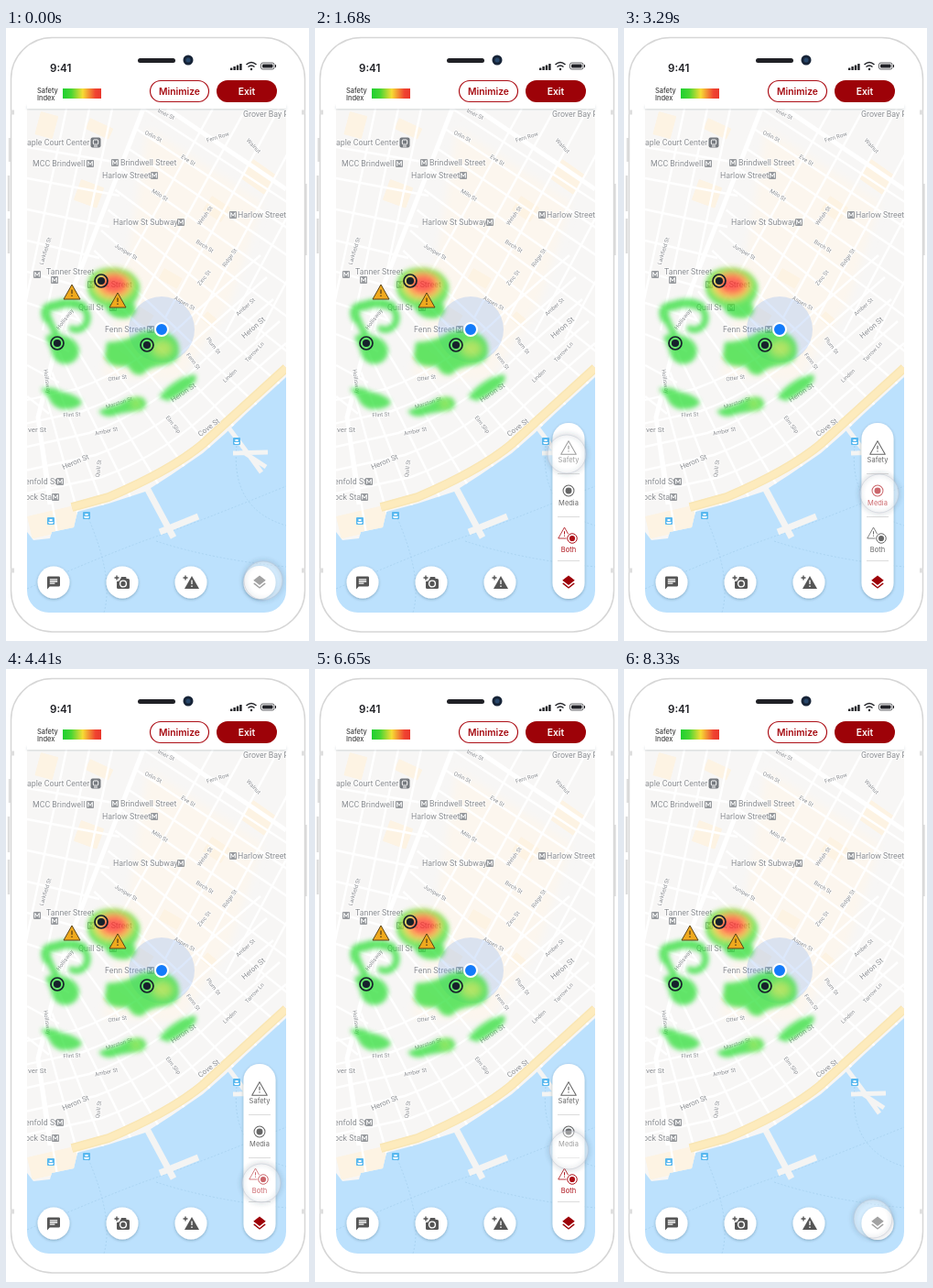
These frames come from a looping animation (331 px wide and 669 px high, 8400 ms). An HTML page:

```html
<!DOCTYPE html>
<html lang="en">
<head>
<meta charset="utf-8">
<title>Safety map</title>
<style>
html, body { margin: 0; width: 100%; height: 100%; overflow: hidden; background: #fff; }
svg { display: block; width: 331px; height: 669px; }
text { font-family: Inter, Roboto, sans-serif; }
.map text { font-family: Roboto, Arial, sans-serif; fill: #8a8d91; stroke: #fff; stroke-width: 1.6px; stroke-opacity: .8; paint-order: stroke; }
.item { --c: #666; color: var(--c); }
.item.on { --c: #ad1018; }
.item text { font-size: 7.5px; text-anchor: middle; fill: currentColor; }
</style>
</head>
<body>
<svg id="stage" viewBox="0 0 331 669" xmlns="http://www.w3.org/2000/svg"></svg>
<script>
const LOOP = 8400, STEP = 70;
const many = (n, fn) => Array.from({ length: n }, (_, i) => fn(i)).join('');
const path = (d, attrs = '') => `<path d="${d}" ${attrs}/>`;
const at = (x, y, body, scale = 1) => `<g transform="translate(${x} ${y}) scale(${scale})">${body}</g>`;
const disc = (x, y, r, attrs) => `<circle cx="${x}" cy="${y}" r="${r}" ${attrs}/>`;
const box = (x, y, w, h, r, attrs) => `<rect x="${x}" y="${y}" width="${w}" height="${h}" rx="${r}" ${attrs}/>`;

const LAND = 'M23 88H306V381L262 421L239 443L215 464L180 488L152 506L112 519L78 528L74 545L50 550L48 557L30 559L23 550Z';
const ROAD = 'M72 523L112 512Q180 483 215 454L240 431L306 371';
const LAYERS = 'M12 18.5L4.6 12.8L3 14.1L12 21L21 14.1L19.4 12.8ZM12 16L21 9L12 2L3 9Z';
const CHAT = 'M20 2H4Q2 2 2 4V22L6 18H20Q22 18 22 16V4Q22 2 20 2ZM6 6H18V8H6ZM6 9H18V11H6ZM6 12H14V14H6Z';

// Horizontal station names and their markers
const places = [
  ['aple Court Center', 23, 128], ['MCC Brindwell', 29, 151], ['Brindwell Street', 125, 150],
  ['Harlow Street', 105, 164], ['Harlow St Subway', 117, 215], ['Harlow Street', 253, 207],
  ['Tanner Street', 44, 269], ['k Street', 108, 283], ['Quill St', 79, 308],
  ['Fenn Street', 108, 332], ['enfold St', 21, 498], ['ock Sta', 21, 515], ['Grover Bay P', 259, 97]
];
const stations = [[92, 148], [119, 147], [162, 161], [191, 212], [248, 204], [34, 269], [53, 275],
  [93, 280], [117, 305], [158, 329], [59, 495], [54, 512]];

// Angled street names: text, x, y, rotation
const streets = [
  ['lmer St', 174, 96, 25], ['Orlin St', 160, 120, 27], ['Fern Row', 232, 121, -17],
  ['Walnut', 269, 130, 46], ['Milo St', 167, 184, 32], ['Welsh St', 219, 206, -54],
  ['Eve St', 198, 146, 32], ['Juniper St', 130, 246, 32], ['Aspen St', 194, 302, 30],
  ['Larkfield St', 45, 244, -73], ['Hollisway', 66, 319, -53], ['Birch St', 216, 240, 32],
  ['Ridge St', 246, 252, -55], ['Zinc St', 218, 274, -52], ['Amber St', 263, 306, -42],
  ['Plum St', 225, 348, 52], ['Fenn St', 203, 365, 52], ['Otter St', 122, 384, -8],
  ['Marston St', 124, 411, -18], ['Amber St', 110, 442, -12], ['Flint St', 72, 424, -3],
  ['Hollisway', 43, 386, 82], ['Tarrow Ln', 273, 355, -47], ['Linden', 246, 381, -43],
  ['Elm Slip', 181, 434, 52], ['Quill St', 103, 481, -82]
];
const avenues = [['Heron St', 272, 329, -41], ['Heron St', 195, 400, -34],
  ['Heron St', 77, 476, -23], ['Cove St', 223, 438, -37], ['ver St', 34, 441, 0]];

const turned = size => ([s, x, y, a]) =>
  `<text font-size="${size}" text-anchor="middle" transform="translate(${x} ${y}) rotate(${a})">${s}</text>`;

function streetGrid() {
  const shoreLines = many(5, i => path('M23 508L105 490Q175 465 235 406L306 344', `transform="translate(${-7 * i} ${-24 * i})"`));
  const crossings = many(16, i => {
    const k = i / 15, angle = (33 + 48 * k * k) * Math.PI / 180;
    const x = 150 - 115 * k, y = 88 + 332 * k;
    return path(`M${x} ${y}l${260 * Math.cos(angle)} ${260 * Math.sin(angle)}`);
  });
  const west = many(9, i => path(`M23 ${130 + 34 * i}l${112 - 11 * i} 19`));
  const north = many(3, i => path(`M${15 + 25 * i} 330L${66 + 25 * i} 88`));
  const east = many(7, i => path(`M${108 + 33 * i} ${300 + 8 * i}L${226 + 36 * i} 88`));
  return `<g fill="none" stroke="#fff" stroke-width="2.4">${shoreLines + crossings + west + north + east}
    <g stroke-width="5">${path('M150 88L65 306L35 425L48 520')}${path('M176 88L306 176')}</g></g>`;
}

function pier() {
  return `<g fill="none" stroke="#f4f4f3">
    ${path('M154 502L183 556M168 550L210 533', 'stroke-width="7"')}
    ${path('M243 436L261 460L279 485M248 464L286 463M261 464L284 479', 'stroke-width="5"')}</g>`;
}

function mapLayer() {
  const blocks = [[82, 165, 27, 24, 20], [38, 91, 20, 26, 15], [92, 98, 28, 13, 25], [270, 143, 32, 25, 35],
    [225, 183, 24, 19, 33], [173, 262, 23, 13, 30], [143, 302, 22, 15, 32], [115, 346, 24, 18, 35],
    [220, 309, 16, 11, 40], [23, 533, 54, 25, -13]];
  const boats = [[49, 538], [88, 532], [252, 451]];
  return `<g class="map" clip-path="url(#screen)">
    ${box(23, 88, 283, 550, 0, 'fill="#bce1fd"')}
    ${path('M23 612Q120 570 164 555T306 500M90 535Q118 600 107 638M164 560Q225 580 306 588M252 456Q245 525 306 543',
      'fill="none" stroke="#a5d0ee" stroke-width=".8" stroke-dasharray="2 2"')}
    ${pier()}${path(LAND, 'fill="#f7f6f5"')}
    <g clip-path="url(#land)">
      ${path('M155 110L280 190L245 300L190 385L105 380L130 270Z', 'fill="#fcf6ee" filter="url(#wide)"')}
      ${blocks.map(([x, y, w, h, a]) => box(x, y, w, h, 1, `fill="#fdf3e3" transform="rotate(${a} ${x} ${y})"`)).join('')}
      ${streetGrid()}
      ${path(ROAD, 'fill="none" stroke="#f9e6b4" stroke-width="10"')}
      ${path(ROAD, 'fill="none" stroke="#fdebbd" stroke-width="7"')}
    </g>
    ${places.map(([s, x, y]) => `<text font-size="8.8" x="${x}" y="${y}">${s}</text>`).join('')}
    ${streets.map(turned(6.2)).join('')}${avenues.map(turned(8)).join('')}
    ${stations.map(([x, y]) => at(x, y, box(-4, -4, 8, 8, 1, 'fill="#96999d"') +
      path('M-2.3 2.5V-2.5L0 1L2.3-2.5V2.5', 'fill="none" stroke="#fff" stroke-width="1"'))).join('')}
    ${at(98, 125, box(-5.5, -5.5, 11, 11, 2, 'fill="#777b80"') + box(-2.7, -3, 5.4, 5, 1, 'fill="none" stroke="#fff"') + path('M-2 4H2', 'stroke="#fff"'))}
    ${boats.map(([x, y]) => at(x, y, box(-4, -4, 8, 8, 1, 'fill="#59b8ef"') + path('M-3 1H3L2 3H-2ZM-1.5-2H1.5V0H-1.5Z', 'fill="#fff"'))).join('')}
  </g>`;
}

function heatLayer() {
  const green = [
    'M89 281Q90 263 114 262Q140 262 146 281Q146 294 139 300Q147 313 131 317Q113 318 108 304Q89 298 89 281Z',
    'M43 337Q51 331 60 335Q78 338 80 352Q79 366 64 367Q51 365 49 351Z',
    'M110 343Q133 342 147 332Q181 326 188 345Q193 365 172 368Q156 370 149 378Q139 381 133 369Q111 371 108 359Z',
    'M38 394Q49 390 61 397Q80 401 83 409Q79 417 60 416Q50 413 47 404Z',
    'M101 418Q112 413 124 410Q138 400 150 404Q157 411 148 417L124 421Q109 428 101 418Z',
    'M167 403Q175 391 192 382L206 378Q211 382 202 391Q190 401 177 407Z'
  ];
  return `<g opacity=".74">
    <g fill="#2fdf38" filter="url(#soft)">${green.map(d => path(d)).join('')}
      ${path('M45 317Q39 304 54 303Q70 297 84 304', 'fill="none" stroke="#2fdf38" stroke-width="10" stroke-linecap="round"')}
      ${path('M84 304Q93 316 86 325Q78 332 72 328M46 315Q50 328 57 336', 'fill="none" stroke="#2fdf38" stroke-width="7" stroke-linecap="round"')}
    </g>
    <g filter="url(#wide)">
      <ellipse cx="117" cy="281" rx="23" ry="17" fill="#ffe12f"/>
      <ellipse cx="118" cy="280" rx="17" ry="13" fill="#ff2c20"/>
      <ellipse cx="171" cy="350" rx="12" ry="10" fill="#a5e534"/>
      <ellipse cx="142" cy="410" rx="4" ry="4" fill="#c2e52d"/>
    </g></g>`;
}

const bang = color => path('M0-2.5V2M0 3.5V5', `stroke="${color}" stroke-width="1.3" fill="none"`);
const triangle = (fill, color, width) =>
  path('M0-8L9 8H-9Z', `fill="${fill}" stroke="${color}" stroke-width="${width}" stroke-linejoin="round"`) + bang(color);
const target = (x, y, s = 1, width = 1.7) =>
  at(x, y, disc(0, 0, 7, `fill="none" stroke="currentColor" stroke-width="${width}"`) +
    disc(0, 0, 4.1, 'fill="currentColor"'), s);

const range = () => disc(170, 329, 36, 'fill="#7aa5f0" opacity=".26"');

function markers() {
  return disc(170, 329, 7, 'fill="#147bfa" stroke="#fff" stroke-width="2"') +
    `<g id="alerts">${[[72, 288], [122, 297]].map(([x, y]) => at(x, y, triangle('#efa91d', '#5b4318', 1))).join('')}</g>` +
    `<g id="pins" color="#17212b">${[[104, 276], [56, 344], [154, 346]].map(p => target(...p)).join('')}</g>`;
}

function phone() {
  return `<g fill="none" stroke="#d6d6d6">
      ${path('M4 120V146M3 161V200M3 208V246M327.500 170V248', 'stroke="#dedede" stroke-width="2.5"')}
      ${box(5.500, 10.500, 321, 648.500, 45, 'fill="#fff" stroke-width="1.5"')}
      ${path('M5 92H9M323 92H327M5 592H9M323 592H327', 'stroke="#dedede" stroke-width="5"')}</g>`;
}

function header() {
  const dark = '#202126';
  return box(23, 84, 283, 4, 0, 'fill="#fff" filter="url(#shade)" opacity=".5"') + box(23, 52, 283, 36, 0, 'fill="#fff"') +
    box(144, 33, 41, 5, 2.5, `fill="${dark}"`) + disc(199, 35, 5.5, 'fill="#172437"') + disc(199, 35, 2.5, 'fill="#28476b"') +
    `<text x="48" y="48" font-size="11.6" font-weight="600" fill="${dark}">9:41</text>` +
    many(4, i => box(245 + 3.4 * i, 43.5 - 1.5 * i, 2.4, 2.5 + 1.5 * i, .5, `fill="${dark}"`)) +
    path('M262.500 40Q268 35 273.500 40M264.500 42.500Q268 39.500 271.500 42.500', `fill="none" stroke="${dark}" stroke-width="1.5"`) +
    disc(268, 45, 1.2, `fill="${dark}"`) +
    box(278.5, 38, 14.5, 7, 2, `fill="none" stroke="${dark}" stroke-width=".7"`) + box(280, 39.5, 11.5, 4, 1, `fill="${dark}"`) +
    path('M294.500 40V43', `stroke="${dark}"`) +
    `<g font-size="7.5" fill="#222"><text x="34" y="70.500">Safety</text><text x="34" y="79">Index</text></g>` +
    box(62, 66, 42, 11, 0, 'fill="url(#scale)"') +
    box(157.5, 57.500, 64, 23, 11.5, 'fill="#fff" stroke="#ad1018" stroke-width="1.2"') +
    box(230, 57, 66, 24, 12, 'fill="#9d0208"') +
    `<g font-size="10.300" font-weight="600" text-anchor="middle">
      <text x="189.500" y="72.800" fill="#a50910">Minimize</text><text x="263" y="72.800" fill="#fff">Exit</text></g>`;
}

function actions() {
  const plus = path('M-8.500-5H-3.500M-6-7.500V-2.500', 'stroke="#555" stroke-width="1.4"');
  const camera = box(-6, -4, 14, 11, 1.5, 'fill="#555"') + box(-1.5, -6, 6, 4, 1, 'fill="#555"') +
    disc(1, 1.5, 3.4, 'fill="none" stroke="#fff" stroke-width="1.4"') + disc(-6, -5, 4, 'fill="#fff"') + plus;
  const alert = path('M1-7L9 7H-7Z', 'fill="#555"') + at(1, 0, bang('#fff')) + disc(-6, -5, 3.5, 'fill="#fff"') + plus;
  const icons = [at(-8.4, -8, path(CHAT, 'fill="#555" fill-rule="evenodd"'), .7), camera, alert];
  return icons.map((icon, i) => at(52 + 75 * i, 605,
    disc(0, 0, 17.5, 'fill="#fff" filter="url(#shade)"') + icon)).join('');
}

function menu() {
  const item = (id, y, label, icon) => `<g class="item" id="${id}">${icon}<text x="277" y="${y}">${label}</text></g>`;
  const line = triangle('none', 'currentColor', 1.1);
  return box(259.5, 587, 35, 36, 17.5, 'id="pill" fill="#fff" filter="url(#shade)"') +
    `<g id="items">
      ${path('M265 486.500H289M265 533.500H289M265 581.500H289', 'stroke="#dcdcdc"')}
      ${item('safety', 474, 'Safety', at(277, 458, line, .92))}
      ${item('media', 520.5, 'Media', target(277, 505, .85, 1.2))}
      ${item('both', 572, 'Both', at(272.500, 551, line, .75) + disc(281, 557, 6.5, 'fill="#fff"') + target(281, 557, .75, 1.3))}
    </g>` + at(268, 596, path(LAYERS, 'id="layers"'), .75);
}

document.getElementById('stage').innerHTML = `
  <defs>
    <clipPath id="screen">${box(23, 60, 283, 578, 24, '')}</clipPath>
    <clipPath id="land">${path(LAND)}</clipPath>
    <filter id="soft" x="-20%" y="-20%" width="140%" height="140%"><feGaussianBlur stdDeviation="2.6"/></filter>
    <filter id="wide" x="-30%" y="-30%" width="160%" height="160%"><feGaussianBlur stdDeviation="4"/></filter>
    <filter id="shade" x="-40%" y="-40%" width="180%" height="180%"><feDropShadow dx="0" dy="1" stdDeviation="1.8" flood-color="#234" flood-opacity=".34"/></filter>
    <linearGradient id="scale"><stop stop-color="#1fcf30"/><stop offset=".22" stop-color="#48d633"/><stop offset=".52" stop-color="#f6dd35"/><stop offset=".85" stop-color="#f04331"/><stop offset="1" stop-color="#e9372c"/></linearGradient>
  </defs>
  ${phone()}${mapLayer()}${range()}${heatLayer()}${markers()}${header()}${actions()}${menu()}
  <g id="cursor"><circle r="21" fill="none" stroke="#345" stroke-opacity=".35" stroke-width="2" filter="url(#soft)"/>
    <circle r="21" fill="#fff" fill-opacity=".36" stroke="#b9c4ce" stroke-opacity=".6" stroke-width=".8"/></g>`;

const $ = id => document.getElementById(id);
const ease = p => p * p * (3 - 2 * p);
const ramp = (t, start, end) => ease(Math.min(1, Math.max(0, (t - start) / (end - start))));

// Pointer path: time, x, y
const route = [[0, 281, 603], [280, 283, 605], [770, 281, 604], [1540, 276, 466], [1680, 275, 465], [2380, 276, 464],
  [2870, 279, 508], [3570, 279, 508], [4060, 279, 561], [4690, 279, 561],
  [5740, 267, 437], [5880, 267, 437], [7280, 285, 590], [7490, 285, 594], [7840, 283, 600], [8330, 272, 600], [8400, 281, 603]];

function pointer(t) {
  const i = Math.max(1, route.findIndex(k => k[0] >= t));
  const [t0, x0, y0] = route[i - 1], [t1, x1, y1] = route[i];
  const p = ramp(t, t0, t1);
  return [x0 + (x1 - x0) * p, y0 + (y1 - y0) * p];
}

function draw(t) {
  const open = ramp(t, 560, 910) * (1 - ramp(t, 7630, 7980));
  const mode = t >= 1960 && t < 3010 ? 'safety' : t >= 3010 && t < 4200 ? 'media' : 'both';
  const height = 36 + 156 * open;
  $('pill').setAttribute('height', height);
  $('pill').setAttribute('y', 623 - height);
  $('items').setAttribute('opacity', Math.max(0, open * 2 - 1));
  $('layers').setAttribute('fill', open > .5 ? '#9d0208' : '#6e6e6e');
  for (const id of ['safety', 'media', 'both']) $(id).classList.toggle('on', id === mode);
  $('alerts').setAttribute('opacity', mode === 'media' ? 0 : 1);
  $('pins').setAttribute('opacity', mode === 'safety' ? 0 : 1);
  $('cursor').setAttribute('transform', `translate(${pointer(t).join(' ')})`);
}

const began = performance.now();
function tick() {
  const t = (performance.now() - began) % LOOP;
  draw(Math.floor(t / STEP) * STEP);
  requestAnimationFrame(tick);
}
tick();
</script>
</body>
</html>
```
